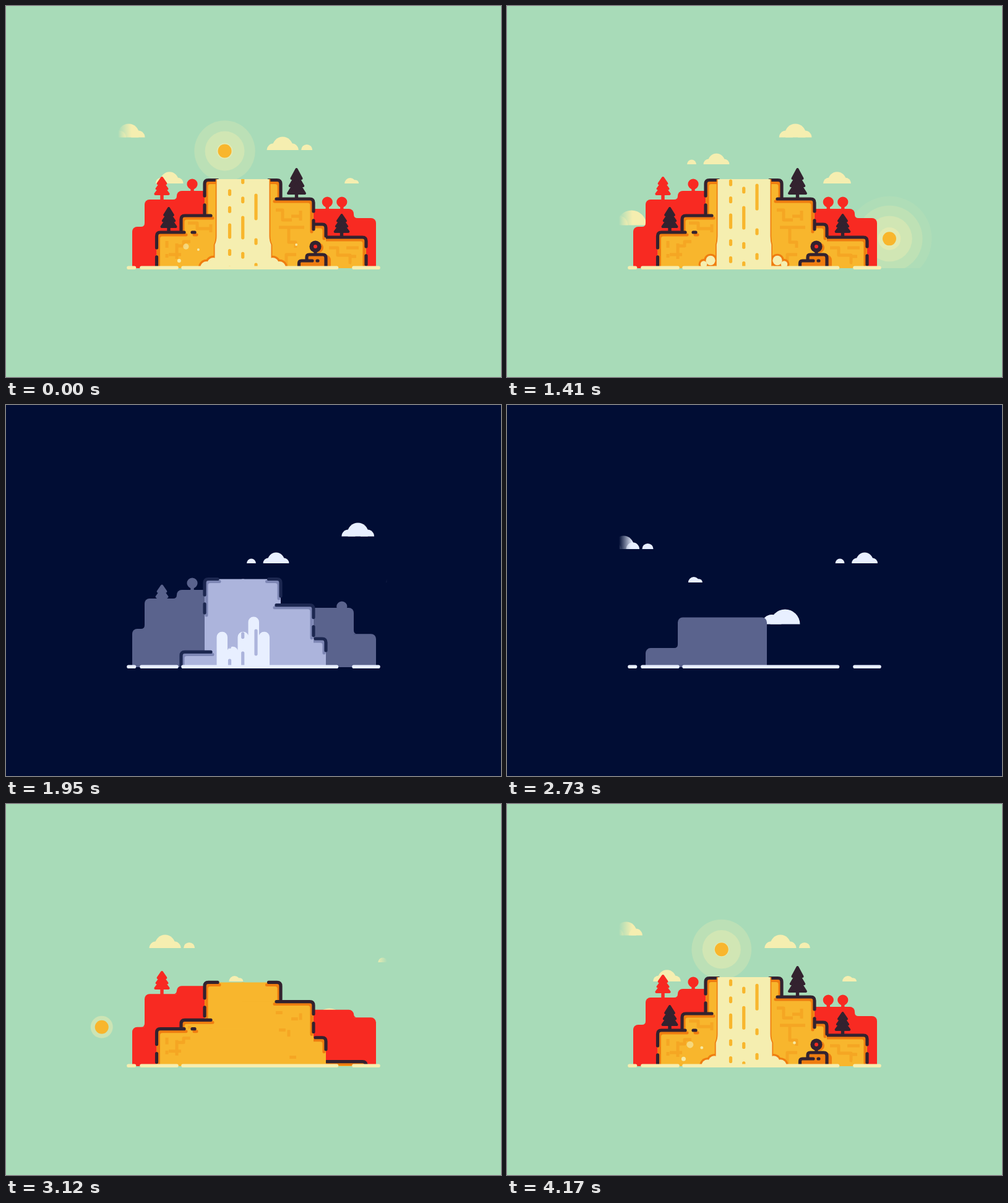
Animation of 800 by 600 pixels, one loop 4.2 s. Source, as an HTML page with a canvas:

```html
<!DOCTYPE html>
<html lang="en">
<head>
<meta charset="utf-8">
<title>Waterfall day and night</title>
<style>
html, body { margin: 0; width: 100%; height: 100%; overflow: hidden; background: #a8dbb8; }
canvas { display: block; }
</style>
</head>
<body>
<canvas id="stage" width="800" height="600"></canvas>
<script>
const ctx = document.getElementById('stage').getContext('2d');
const LOOP = 4200, GROUND = 424, MIDDLE = 383, LIP = 280;

// [day, night]
const PALETTE = {
  sky: [0xa8dbb8, 0x010d34],
  red: [0xf82a22, 0x5a638d],
  rock: [0xf8b62d, 0xacb4dc],
  dark: [0x33222f, 0x1c2750],
  shade: [0xef7d10, 0x7d86b4],
  crack: [0xf5a623, 0xa0aad0],
  cream: [0xf5eeb0, 0xe8efff]
};
const col = {};

const clamp = v => Math.max(0, Math.min(1, v));
const lerp = (a, b, k) => a + (b - a) * k;
const channels = h => [h >> 16, h >> 8 & 255, h & 255];
const rgba = (c, a = 1) => `rgba(${c.map(Math.round)},${a})`;

function mixColours(night) {
  for (const name in PALETTE) {
    const [a, b] = PALETTE[name].map(channels);
    col[name] = a.map((v, i) => lerp(v, b[i], night));
  }
}

// Time t runs from -1700 (night) over 0 (day) to 2500 (night).
// How far a part is sunk: 0 standing, 1 gone, below 0 overshooting
function sunk(t, { leave, enter }) {
  if (t > 0) return clamp((t - leave) / 300) ** 2;
  const v = clamp((t - enter) / 700) - 1;
  return -2.2 * v ** 3 - 1.2 * v * v;
}

function disc(x, y, r) {
  if (r <= 0) return;
  ctx.beginPath();
  ctx.arc(x, y, r, 0, 7);
  ctx.fill();
}

function bar(x, y, w, h, radii) {
  ctx.beginPath();
  ctx.roundRect(x, y, w, h, radii);
  ctx.fill();
}

function line(path, colour, width, dash = []) {
  ctx.setLineDash(dash);
  ctx.strokeStyle = colour;
  ctx.lineWidth = width;
  ctx.stroke(new Path2D(path));
  ctx.setLineDash([]);
}

function clipRect(w, h, draw) {
  ctx.save();
  ctx.beginPath();
  ctx.rect(0, 0, w, h);
  ctx.clip();
  draw();
  ctx.restore();
}

function shifted(x, y, draw) {
  ctx.save();
  ctx.translate(x, y);
  draw();
  ctx.restore();
}

// ---- sky ----
// noon: time at which the cloud passes x = 400
const CLOUDS = [
  { base: 212.5, noon: 1063, speed: .19, r: 17, lobes: [-1, 1] },
  { base: 233, noon: -267, speed: .176, r: 16.5, lobes: [-1, 1], puff: 39 },
  { base: 256, noon: 1750, speed: .1815, r: 13.5, lobes: [-1, 1], puff: -40 },
  { base: 287, noon: 712, speed: .191, r: 14.5, lobes: [-1, 1] },
  { base: 287, noon: -902, speed: .173, r: 9, lobes: [1] },
  { base: 354.5, noon: 2468, speed: .188, r: 24, lobes: [-1] }
];

function drawClouds(t) {
  const fade = ctx.createLinearGradient(181, 0, 616, 0);
  [[0, 0], [.05, 1], [.96, 1], [1, 0]].forEach(([p, a]) => fade.addColorStop(p, rgba(col.cream, a)));
  ctx.fillStyle = fade;
  for (const { base, noon, speed, r, lobes, puff } of CLOUDS) {
    const since = (t - noon + 2.5 * LOOP) % LOOP - LOOP / 2;
    const x = 400 + speed * since;
    clipRect(800, base, () => {
      disc(x, base - (lobes.length > 1 ? .3 * r : 0), r);
      for (const side of lobes) disc(x + side * .9 * r, base, .65 * r);
      if (puff) disc(x + puff, base, .55 * r);
    });
  }
}

function drawSun(t) {
  const late = Math.max(0, t - 960);
  const angle = (-4.7 + .0514 * t - .0047 * late) * Math.PI / 180;
  const orbit = 252.8 + .033 * late;
  const x = 374 + orbit * Math.sin(angle), y = 486.5 - orbit * Math.cos(angle);
  const fade = clamp((1760 - t) / 260);
  for (let born = -1330; born < t; born += 620) {
    const age = t - born;
    ctx.fillStyle = rgba(col.cream, fade * .5 * clamp(1 - age / 2600));
    disc(x, y, 10 + .0325 * age - 2.3e-6 * age * age);
  }
  ctx.fillStyle = rgba(col.rock, fade);
  disc(x, y, 11);
}

// ---- plants, standing on y = 0 ----
function pine(h, colour) {
  const half = 4 + .22 * h;
  ctx.fillStyle = ctx.strokeStyle = colour;
  ctx.lineWidth = 4;
  for (let i = 0; i < 3; i++) {
    const w = half * (.6 + .2 * i), apex = -h - 5 + h * .2 * i, foot = -9 - h * .28 * (2 - i);
    ctx.beginPath();
    ctx.moveTo(0, apex);
    ctx.lineTo(w, foot);
    ctx.lineTo(-w, foot);
    ctx.closePath();
    ctx.fill();
    ctx.stroke();
  }
  ctx.fillRect(-2.7, -9, 5.4, 11);
}

function bush(colour) {
  ctx.fillStyle = colour;
  disc(0, -11, 8.6);
  ctx.fillRect(-2.7, -11, 5.4, 13);
}

// Plants slide out of the step they stand on
function drawPlants(t, plants, colour) {
  for (const p of plants) {
    const y = stepTop(t, p.on) + (p.h ? 55 : 25) * sunk(t, p);
    shifted(p.x, y, () => p.h ? pine(p.h, colour) : bush(colour));
  }
}

const stepTop = (t, step) => lerp(step.top, GROUND, sunk(t, step));

// ---- far hills, from the outside in ----
const LEFT = [
  { outer: 204, top: 357, leave: 1869, enter: -1350 },
  { outer: 224, top: 313, leave: 1950, enter: -1520 },
  { outer: 276, top: 299, leave: 1980, enter: -1610 }
];
const RIGHT = [
  { outer: 598, top: 343, leave: 1777, enter: -1370 },
  { outer: 562, top: 328, leave: 1950, enter: -1355 }
];
const RED_PLANTS = [
  { x: 252, on: LEFT[1], h: 30, leave: 1797, enter: -1400 },
  { x: 301, on: LEFT[2], leave: 1950, enter: -1050 },
  { x: 519.3, on: RIGHT[1], leave: 1650, enter: -950 },
  { x: 542.8, on: RIGHT[1], leave: 1770, enter: -900 }
];

function drawHills(t) {
  const red = rgba(col.red);
  drawPlants(t, RED_PLANTS, red);
  ctx.fillStyle = red;
  for (const [hills, inner, out] of [[LEFT, 420, -1], [RIGHT, 400, 1]]) {
    hills.forEach((hill, i) => {
      const y = stepTop(t, hill), next = hills[i + 1];
      if (y >= GROUND) return;
      bar(Math.min(inner, hill.outer), y, Math.abs(inner - hill.outer), GROUND - y + 10, [8, 8, 0, 0]);
      // soft inner corner where the next hill rises
      if (next) ctx.fill(new Path2D(`M${next.outer},${y - 6}q0,6 ${6 * out},6h${-6 * out}Z`));
    });
  }
}

// ---- near cliffs: outline runs from inner x over the corner down to foot ----
const CLIFFS = {
  peakLeft: { inner: 342, outer: 321, top: 281.5, foot: 336, leave: 1980, enter: -1355 },
  peakRight: { inner: 424.5, outer: 444, top: 281.5, foot: 309, leave: 1980, enter: -1355 },
  rightLow: { inner: 518, outer: 582, top: 374, foot: 418, leave: 1650, enter: -1105,
    crack: 'M522,391H536V403H556V415H566M550,391H570M556,405H566' },
  rightMid: { inner: 500, outer: 517, top: 353, foot: 372, leave: 1773, enter: -1222 },
  rightHigh: { inner: 437, outer: 497, top: 312, foot: 361, leave: 1854, enter: -1342,
    crack: 'M436,330H447V346H462M476,331V347M461,340H478M441,358H482M457,358V382H468V391M469,402H453V420' },
  leftHigh: { inner: 331, outer: 283, top: 339, foot: 363, leave: 1698, enter: -1311,
    crack: 'M294,351H309V360H331M331,353V368' },
  leftLow: { inner: 288, outer: 243.5, top: 366, foot: 420, leave: 1650, enter: -1458, dot: 'M301,366h4',
    crack: 'M260,380V391M260,401V407M263,402H283M276,384V409M274,388H287V381H298' }
};
const DARK_PLANTS = [
  { x: 469.5, on: CLIFFS.rightHigh, h: 43, leave: 1650, enter: -950 },
  { x: 263, on: CLIFFS.leftLow, h: 34, leave: 1650, enter: -850 },
  { x: 542.5, on: CLIFFS.rightLow, h: 31, leave: 1650, enter: -750 }
];
const BOULDERS = { leave: 1650, enter: -750 };

function drawCliff(t, { inner, outer, top, foot, leave, enter, crack, dot = '' }) {
  const side = Math.sign(outer - inner), height = foot - top;
  const path = `M${inner},${top}H${outer - 6 * side}q${6 * side},0 ${6 * side},6V${foot}`;
  const length = Math.abs(outer - inner) + height - 2.6;
  ctx.fillStyle = rgba(col.rock);
  bar(Math.min(outer, MIDDLE - 2), top, Math.abs(outer - MIDDLE) + 2, GROUND - top + 20,
    side < 0 ? [6, 0, 0, 0] : [0, 6, 0, 0]);
  shifted(-3 * side, 4, () => line(path + dot, rgba(col.shade), 5));
  const k = t > 0 ? 1 - clamp((t - 1690) / 210) : clamp((t - enter - 200) / 350);
  if (crack && k) {
    ctx.lineCap = 'butt';
    line(crack, rgba(col.crack), 5, [60 * k, 200]);
    ctx.lineCap = 'round';
  }
  // tall outlines are broken once near the foot
  line(path, rgba(col.dark), 5.2, height > 36 ? [length - 29, 15, 14, 99] : []);
  line(dot, rgba(col.dark), 5.2);
}

function drawBoulders() {
  const { shade, dark, red } = col;
  ctx.fillStyle = rgba(shade);
  disc(505, 391, 8);
  bar(498, 402, 27, 30, [0, 9, 0, 0]);
  ctx.fill(new Path2D('M473,426V412H486V402H517V426Z'));
  line('M486,410V406q0,-4 4,-4H512q5,0 5,5V426M473.5,426V416q0,-4 4,-4H495M503,412h1M500,396V401', rgba(dark), 5.2);
  ctx.fillStyle = rgba(dark);
  disc(500, 389, 9.6);
  ctx.fillStyle = rgba(red);
  disc(500, 389, 3);
}

function drawCliffs(t) {
  drawPlants(t, DARK_PLANTS, rgba(col.dark));
  for (const cliff of Object.values(CLIFFS)) {
    const y = stepTop(t, cliff);
    if (y < GROUND) shifted(0, y - cliff.top, () => drawCliff(t, cliff));
  }
  shifted(0, 50 * sunk(t, BOULDERS), drawBoulders);
}

// ---- waterfall ----
// Falling marks: one long and some short ones, evenly spaced in each period
const PERIOD = 152, SHORT = 11;
const MARKS = [
  { x: 361.5, start: 351, long: 25, shorts: 4 },
  { x: 382.7, start: 339, long: 38, shorts: 3 },
  { x: 404, start: 303, long: 43, shorts: 2 }
];

function drawMarks(t) {
  ctx.fillStyle = rgba(col.rock);
  for (const { x, start, long, shorts } of MARKS) {
    const gap = (PERIOD - long - SHORT * shorts) / (shorts + 1);
    const first = (start + .42 * t + 10 * PERIOD) % PERIOD;
    for (let y = first; y < GROUND; y += PERIOD) {
      bar(x - 2.6, y, 5.2, long, 2.6);
      for (let i = 0; i < shorts; i++) bar(x - 2.6, y + long + gap + i * (gap + SHORT), 5.2, SHORT, 2.6);
    }
  }
}

function drawDrops(t) {
  if (t < -270 || t > 170) return;
  [[291, 389, 4.7], [311, 394, 2], [280, 412, 3], [469, 386, 2]].forEach(([x, y, r], i) => {
    ctx.fillStyle = rgba(col.cream, i ? .9 : .6);
    disc(x + (x - MIDDLE) * .0018 * t, y + .00025 * t * t, r * Math.min(1.2, 1 - t / 170));
  });
}

function drawFoam(t, grow, rim) {
  const k = clamp(t / 960);
  for (const side of [-1, 1]) for (const j of [0, 1]) {
    const r = (10 + (3 - 4 * j) * k) * grow;
    disc(MIDDLE + side * (48 + 11 * j + 6 * k), 417 + 6 * j - 5.5 * k, r + rim);
  }
}

// Whole sheet of water, flaring at the foot
function sheet(flare, rim) {
  const half = 42.5 + rim, wide = half + flare;
  return new Path2D(`M${MIDDLE - half},${LIP}V372q0,8 ${-flare},14V${GROUND}H${MIDDLE + wide}V386q${-flare},-6 ${-flare},-14V${LIP}Z`);
}

// Five round-ended streams, each falling at its own pace
function streams(age, draining) {
  const shape = new Path2D();
  for (let i = 0; i < 5; i++) {
    const fall = 86 + 24 * Math.sin((2 - i) * Math.PI / 2);
    const y = Math.min(GROUND, LIP + fall * age * age);
    const r = Math.min(8.5, (y - LIP) / 2);
    if (draining) shape.roundRect(340.5 + 17 * i, y, 17.5, GROUND - y, [r, r, 0, 0]);
    else shape.roundRect(340.5 + 17 * i, LIP, 17.5, y - LIP, y < GROUND ? [0, 0, r, r] : 0);
  }
  return shape;
}

function drawWater(t) {
  const draining = t > 0;
  const age = Math.max(0, t - (draining ? 1690 : -640)) / 260;
  const full = draining ? age === 0 : age > 1.53;
  const grow = draining ? 1 - clamp((t - 1250) / 390) : clamp((t + 270) / 250);
  const water = full ? sheet(3 * grow, 0) : streams(age, draining);

  drawDrops(t);
  ctx.fillStyle = rgba(col.shade);
  if (grow) drawFoam(t, grow, 3.2);
  if (full) ctx.fill(sheet(3 * grow, 1.8));
  ctx.fillStyle = rgba(col.cream);
  if (grow) drawFoam(t, grow, 0);
  ctx.fill(water);

  ctx.save();
  ctx.clip(water);
  drawMarks(t);
  ctx.restore();
}

function draw(t) {
  mixColours(t > 0 ? clamp((t - 1480) / 310) : 1 - clamp((t + 1465) / 300));
  ctx.lineCap = ctx.lineJoin = 'round';
  ctx.fillStyle = rgba(col.sky);
  ctx.fillRect(0, 0, 800, 600);
  clipRect(800, GROUND, () => {
    drawSun(t);
    drawClouds(t);
    drawHills(t);
    drawCliffs(t);
    drawWater(t);
  });
  line('M198,423.2H207.5M219,423.2H276M286,423.2H534.5M562,423.2H602', rgba(col.cream), 5.6);
}

function tick() {
  const t = performance.now() % LOOP;
  draw(t < 2500 ? t : t - LOOP);
  requestAnimationFrame(tick);
}
tick();
</script>
</body>
</html>
```
